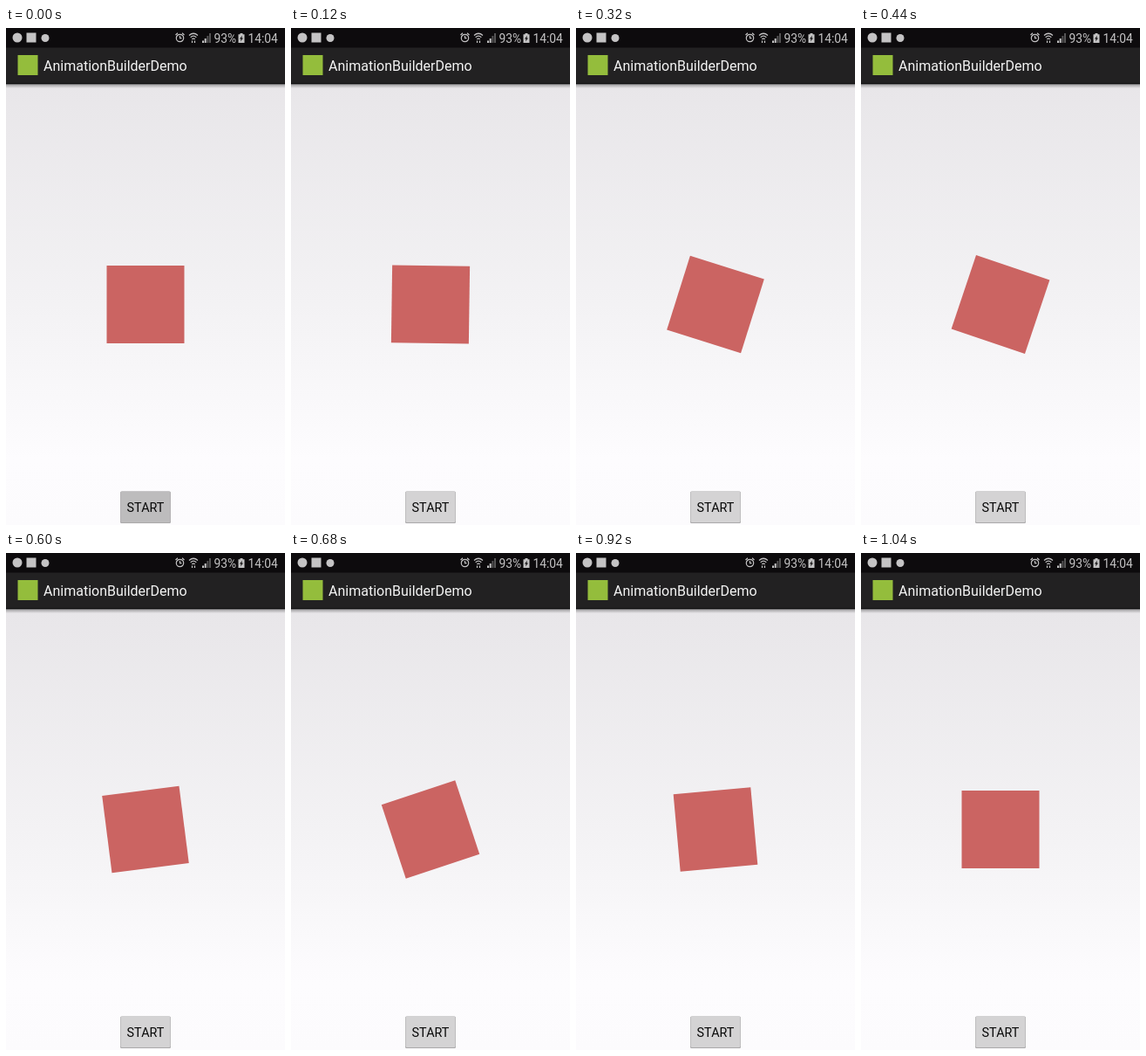
Write an HTML page that moves like this. It is 320 by 569 pixels and loops after 1120 ms.

```html
<!DOCTYPE html>
<html lang="en">
<head>
<meta charset="utf-8">
<title>Rotation demo</title>
<style>
  html, body { margin: 0; width: 100%; height: 100%; overflow: hidden; }
  svg { display: block; width: 100%; height: 100%; font-family: Roboto, Arial, sans-serif; }
</style>
</head>
<body>
<svg viewBox="0 0 320 569" preserveAspectRatio="none">
  <defs>
    <linearGradient id="page" x2="0" y2="1">
      <stop stop-color="#e8e6e9"/>
      <stop offset=".5" stop-color="#f3f2f4"/>
      <stop offset=".85" stop-color="#fdfcfe"/>
      <stop offset="1" stop-color="#fcfbfd"/>
    </linearGradient>
    <linearGradient id="shade" x2="0" y2="1">
      <stop stop-opacity=".35"/>
      <stop offset="1" stop-opacity="0"/>
    </linearGradient>
  </defs>

  <rect y="64" width="320" height="505" fill="url(#page)"/>
  <rect y="64" width="320" height="5" fill="url(#shade)"/>
  <rect width="320" height="23" fill="#0d0b0d"/>
  <rect y="22.5" width="320" height="41.5" fill="#222122"/>
  <rect y="63" width="320" height="1.3" fill="#111"/>

  <!-- status bar -->
  <g fill="#c4c3c4">
    <circle cx="13" cy="11" r="5.5"/>
    <rect x="23.5" y="5.5" width="11" height="11"/>
    <circle cx="45" cy="11.5" r="4.5"/>
    <text x="238.5" y="16.5" font-size="13.8">93%</text>
    <text x="277.5" y="16.5" font-size="13.8">14:04</text>
    <path d="M268.5 6h3v1.2h2V17h-7V7.200h2z"/>
    <path d="M225 17v-2.500h2V17zM227.700 17v-5h2v5z"/>
    <path d="M230.400 17V9h2v8zM233 17V6h2v11z" fill="#555455"/>
    <path d="M271 8.500l-3 4h1.700l-.7 3 3-4h-1.700z" fill="#0d0b0d"/>
  </g>
  <g fill="none" stroke="#c4c3c4" stroke-width="1.2">
    <circle cx="199.500" cy="11.500" r="4.200"/>
    <path d="M199.500 9v2.700h2M194.500 8l2.500-2.300M204.500 8L202 5.700"/>
    <path d="M210 8.500q5-4.500 10 0M211.700 10.700q3.300-3 6.600 0M213.300 12.800q1.700-1.400 3.400 0M213.500 14.500v2.500M216.500 14.500v2.500"/>
  </g>

  <!-- title bar -->
  <rect x="13.500" y="31" width="23" height="23" fill="#94bd3c"/>
  <text x="43" y="49" font-size="16" fill="#f4f4f4">AnimationBuilderDemo</text>

  <rect id="box" x="115.500" y="272" width="89" height="89" fill="#cb6462"/>

  <!-- button -->
  <rect x="131" y="530.500" width="58" height="36.500" rx="1.500" fill="#aaa9aa"/>
  <rect id="button" x="131.500" y="530.500" width="57" height="35.500" rx="1.500"/>
  <text x="160" y="553.500" font-size="14.400" text-anchor="middle" fill="#090909">START</text>
</svg>
<script>
  const box = document.getElementById('box');
  const button = document.getElementById('button');
  const LOOP = 1120, STEP = 40;

  // start ms, duration ms, from and to in degrees
  const swings = [
    [80, 312, 0, 20],
    [402, 320, 20, -20],
    [722, 300, -20, 0]
  ];

  function angle(t) {
    let deg = 0;
    for (const [start, length, from, to] of swings) {
      if (t < start) break;
      const p = Math.min(1, (t - start) / length);
      deg = from + (to - from) * (1 - Math.cos(Math.PI * p)) / 2;
    }
    return deg;
  }

  const origin = performance.now();

  function draw() {
    const elapsed = (performance.now() - origin) % LOOP;
    const t = Math.floor(elapsed / STEP) * STEP;
    box.setAttribute('transform', `rotate(${angle(t)} 160 316.5)`);
    button.setAttribute('fill', t < 80 ? '#bdbcbd' : '#d4d3d4');
    requestAnimationFrame(draw);
  }
  draw();
</script>
</body>
</html>
```
